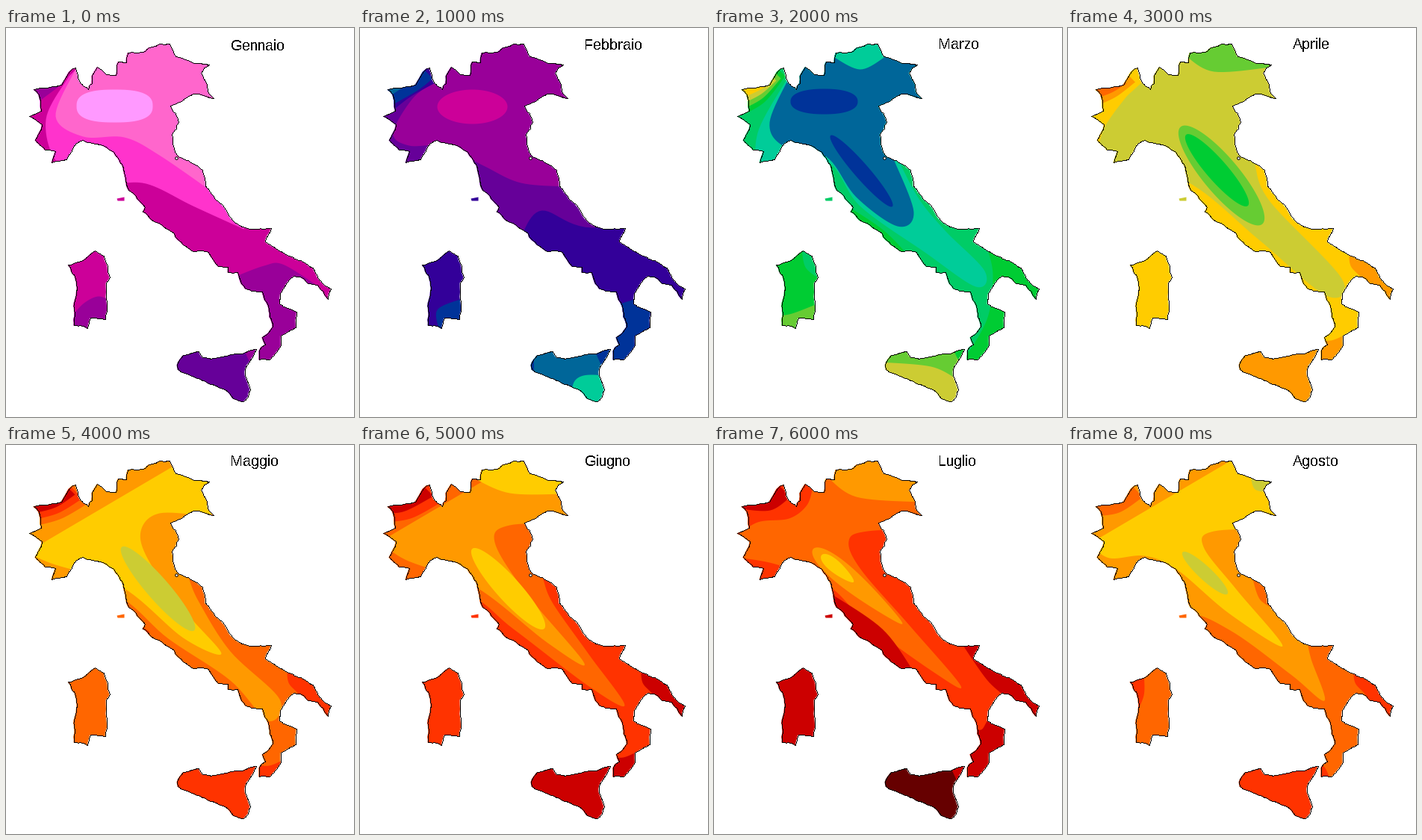
Write a matplotlib script that moves like this. It is 466x521 px and loops after 8 s.

```python
import matplotlib.pyplot as plt
import numpy as np
from matplotlib.animation import FuncAnimation
from matplotlib.patches import Circle, Polygon

W, H = 466, 521
plt.rcParams["text.antialiased"] = False
plt.rcParams["text.hinting"] = "native"
plt.rcParams["text.hinting_factor"] = 1
rng = np.random.default_rng(4)

# Colour scale, cold to hot
ROSE, PINK, FUCHSIA, MAGENTA = "#ff99ff", "#ff66cc", "#ff33cc", "#cc0099"
PURPLE, VIOLET, INDIGO, BLUE = "#990099", "#660099", "#330099", "#003399"
STEEL, TEAL, MINT, GREEN = "#006699", "#00cc99", "#00cc66", "#00cc33"
LIME, OLIVE, YELLOW, ORANGE = "#66cc33", "#cccc33", "#ffcc00", "#ff9900"
AMBER, RED, CRIMSON, MAROON = "#ff6600", "#ff3300", "#cc0000", "#660000"

# Headings, y pointing down
N, S, E, WEST = (0, -1), (0, 1), (1, 0), (-1, 0)
NE, SE, SW, NW, ENE = (1, -1), (1, 1), (-1, 1), (-1, -1), (1.7, -1)


def rough(keys):
    """Coast through the key points, long edges broken up at random."""
    coast = []

    def split(a, b):
        d = b - a
        if np.hypot(*d) < 7:
            coast.append(a)
            return
        mid = (a + b) / 2 + np.array([-d[1], d[0]]) * rng.normal(0, 0.05)
        split(a, mid)
        split(mid, b)

    keys = np.array(keys, float)
    for a, b in zip(keys, np.roll(keys, -1, axis=0)):
        split(a, b)
    return np.array(coast)


ALPS = [
    (36, 82), (58, 79), (73, 76), (88, 54), (92, 53), (98, 73), (109, 82),
    (114, 64), (121, 52), (133, 62), (146, 63), (149, 45), (160, 46),
    (162, 33), (183, 32), (190, 26), (218, 21), (226, 38), (250, 47),
    (271, 49), (260, 60), (268, 75), (269, 85), (277, 94)]
EAST = [
    (266, 91), (250, 88), (234, 98), (219, 104), (230, 126), (221, 142),
    (222, 155), (231, 173), (262, 190), (279, 229), (305, 260), (325, 269),
    (354, 268), (346, 286), (377, 305), (410, 321), (434, 349), (430, 363),
    (416, 344), (393, 333), (384, 332), (366, 356), (365, 369), (388, 380),
    (387, 401), (367, 412), (367, 425), (352, 444), (338, 444), (338, 432)]
SOUTHWEST = [
    (346, 424), (342, 414), (356, 400), (350, 372), (342, 353), (328, 352),
    (314, 342), (309, 327), (296, 327), (296, 320), (283, 319), (270, 300),
    (250, 299), (236, 290), (208, 264), (182, 246), (185, 240), (163, 217),
    (155, 184), (143, 166), (102, 150), (93, 154), (80, 176), (60, 180),
    (65, 165), (51, 163), (38, 150), (47, 129), (30, 118), (46, 111),
    (45, 98)]
MAIN = rough(ALPS + EAST + SOUTHWEST)
SICILY = rough([
    (228, 451), (236, 438), (257, 433), (262, 441), (283, 441), (315, 436),
    (334, 430), (325, 447), (319, 465), (326, 484), (317, 500), (303, 496),
    (292, 484), (266, 473), (248, 466), (229, 457)])
SARDINIA = rough([
    (82, 317), (100, 312), (118, 298), (130, 305), (138, 334), (133, 341),
    (132, 390), (112, 388), (108, 402), (90, 398), (90, 368), (94, 348),
    (91, 332)])
ELBA = [(148, 228), (158, 226), (158, 231), (149, 231)]

fig = plt.figure(figsize=(W / 100, H / 100), dpi=100, facecolor="white")
ax = fig.add_axes([0, 0, 1, 1])
ax.set(xlim=(-0.5, W - 0.5), ylim=(H - 0.5, -0.5))
ax.axis("off")
months = []


def outline(coast):
    """Trace the coast one pixel wide."""
    for a, b in zip(coast, np.roll(coast, -1, axis=0)):
        steps = int(np.ceil(np.abs(b - a).max())) + 1
        x, y = np.round(np.linspace(a, b, steps)).T
        ax.plot(x, y, ",", color="black", zorder=5)


def paint(pts, color, land=None):
    patch = ax.add_patch(Polygon(pts, fc=color, ec="none"))
    if land is not None:
        patch.set_clip_path(Polygon(land).get_path(), ax.transData)
    months[-1].append(patch)


def smooth(pts, n=12):
    """Catmull-Rom curve through the points."""
    p = np.array([pts[0], *pts, pts[-1]], float)[:, None, :]
    a, b, c, d = p[:-3], p[1:-2], p[2:-1], p[3:]
    t = np.linspace(0, 1, n)[None, :, None]
    curve = (2 * b + (c - a) * t + (2 * a - 5 * b + 4 * c - d) * t**2
             + (3 * b - a - 3 * c + d) * t**3) / 2
    return curve.reshape(-1, 2)


def area(land, color, border, heading):
    """Fill everything beyond a smooth border in the given heading."""
    line = smooth(border)
    paint(np.vstack([line, line[::-1] + 500 * np.array(heading)]), color, land)


def blob(color, x, y, rx, ry, tilt=0, power=2, taper=0, land=MAIN):
    """Tilted superellipse, thinner towards one end if tapered."""
    t = np.linspace(0, 2 * np.pi, 120)
    c, s = np.cos(t), np.sin(t)
    u = rx * np.sign(c) * np.abs(c) ** (2 / power)
    v = ry * np.sign(s) * np.abs(s) ** (2 / power) * (1 - taper * c)
    ct, st = np.cos(np.radians(tilt)), np.sin(np.radians(tilt))
    paint(np.column_stack([x + u * ct - v * st, y + u * st + v * ct]),
          color, land)


def alps(outer, inner, *colors):
    """Nested bands in the north-west corner."""
    for f, color in zip(np.linspace(0, 1, len(colors)), colors):
        border = (1 - f) * np.array(outer) + f * np.array(inner)
        area(MAIN, color, border, NW)


def heel(color, dx=0):
    border = [(376, 295), (378, 318), (395, 340), (398, 380)]
    area(MAIN, color, np.array(border) + (dx, 0), E)


def toe(color, y):
    area(MAIN, color, [(330, y), (352, y + 2), (375, y - 8)], S)


def tip(color, x):
    area(SICILY, color, [(x, 428), (x + 10, 450)], E)


def month(name, main, sicily, sardinia, elba, baseline=28):
    months.append([ax.text(300, baseline - 0.5, name, fontsize=14.4,
                           family="Liberation Sans", va="baseline")])
    for land, color in ((MAIN, main), (SICILY, sicily),
                        (SARDINIA, sardinia), (ELBA, elba)):
        paint(land, color)


def gennaio():
    month("Gennaio", MAGENTA, VIOLET, MAGENTA, MAGENTA, 30)
    area(MAIN, FUCHSIA, [(84, 64), (53, 122), (70, 182), (130, 207),
                         (187, 208), (250, 238), (318, 269)], NE)
    area(MAIN, PINK, [(92, 56), (66, 118), (103, 145), (158, 146),
                      (205, 170), (280, 222)], NE)
    blob(ROSE, 145, 104, 51, 22, power=2.6)
    area(MAIN, PURPLE, [(42, 99), (77, 73)], NW)
    area(MAIN, PURPLE, [(305, 333), (345, 318), (370, 316), (414, 343)], S)
    tip(PURPLE, 317)
    area(SARDINIA, PURPLE, [(88, 385), (104, 368), (123, 359), (140, 365)], S)


def febbraio():
    month("Febbraio", VIOLET, STEEL, INDIGO, INDIGO, 29)
    area(MAIN, PURPLE, [(101, 71), (70, 94), (44, 140), (65, 157), (112, 158),
                        (165, 184), (215, 207), (280, 212)], NE)
    blob(MAGENTA, 150, 105, 47, 23)
    area(MAIN, INDIGO, [(40, 113), (68, 91), (106, 70)], NW)
    area(MAIN, BLUE, [(40, 104), (77, 83), (97, 67)], NW)
    area(MAIN, STEEL, [(36, 93), (60, 77)], NW)
    area(MAIN, INDIGO, [(216, 276), (243, 244), (310, 267), (450, 250)], SE)
    area(MAIN, BLUE, [(335, 374), (354, 367), (395, 355)], S)
    blob(TEAL, 310, 484, 26, 20, power=2.5, land=SICILY)
    tip(BLUE, 312)
    area(SICILY, BLUE, [(232, 435), (232, 462)], WEST)
    area(SARDINIA, BLUE, [(107, 408), (103, 377), (140, 361)], SE)


def marzo():
    month("Marzo", MINT, OLIVE, GREEN, MINT)
    area(MAIN, TEAL, [(97, 68), (58, 140), (68, 182), (150, 178), (195, 238),
                      (282, 300), (350, 346), (362, 325), (310, 272),
                      (275, 230), (250, 184)], NE)
    area(MAIN, STEEL, [(101, 64), (74, 126), (93, 158), (150, 172),
                       (190, 226), (245, 265), (267, 246), (240, 175)], NE)
    area(MAIN, TEAL, [(156, 36), (195, 55), (229, 38)], N)
    blob(BLUE, 147, 98, 45, 17, power=2.3)
    blob(BLUE, 197, 191, 63, 10, 49)
    area(MAIN, GREEN, [(180, 239), (226, 270), (258, 302)], SW)
    area(MAIN, GREEN, [(366, 296), (373, 332), (365, 390), (330, 450)], E)
    alps([(40, 115), (68, 98), (95, 64)], [(36, 94), (60, 83), (77, 73)],
         GREEN, LIME, OLIVE, YELLOW)
    area(SICILY, LIME, [(222, 447), (290, 453), (325, 470)], N)
    tip(GREEN, 319)
    area(SARDINIA, MINT, [(117, 295), (122, 320), (140, 335)], NE)
    area(SARDINIA, LIME, [(84, 385), (104, 382), (138, 369)], S)


def aprile():
    month("Aprile", YELLOW, ORANGE, YELLOW, OLIVE)
    area(MAIN, OLIVE, [(100, 64), (45, 140), (60, 185), (158, 205),
                       (255, 283), (345, 358), (366, 335), (270, 232),
                       (250, 184)], NE)
    area(MAIN, LIME, [(156, 36), (195, 58), (272, 52)], N)
    blob(LIME, 205, 197, 85, 24, 50)
    blob(GREEN, 199, 190, 63, 14, 49)
    alps([(40, 113), (70, 97), (101, 70)], [(36, 94), (58, 86), (78, 74)],
         YELLOW, ORANGE, AMBER)
    heel(ORANGE)
    toe(ORANGE, 416)


def maggio():
    month("Maggio", AMBER, RED, AMBER, AMBER)
    area(MAIN, ORANGE, [(30, 200), (140, 198), (217, 259), (300, 315),
                        (350, 369), (366, 340), (300, 276), (258, 210),
                        (245, 180)], N)
    area(MAIN, YELLOW, [(28, 143), (60, 158), (155, 190), (237, 258),
                        (288, 279), (240, 223), (191, 155), (180, 115),
                        (205, 91), (270, 95)], ENE)
    blob(OLIVE, 203, 192, 74, 15, 49)
    alps([(38, 108), (74, 98), (112, 76)], [(36, 91), (66, 83), (92, 66)],
         AMBER, RED, CRIMSON)
    area(MAIN, RED, [(178, 240), (192, 250)], SW)
    heel(RED)
    toe(RED, 427)


def giugno():
    month("Giugno", RED, CRIMSON, RED, RED)
    area(MAIN, AMBER, [(30, 200), (140, 200), (205, 246), (305, 322),
                       (354, 348), (306, 280), (258, 212), (245, 180)], N)
    area(MAIN, ORANGE, [(28, 128), (60, 153), (155, 190), (250, 264),
                        (300, 292), (222, 198), (180, 130), (200, 107),
                        (285, 105)], ENE)
    blob(YELLOW, 198, 192, 72, 16, 48)
    area(MAIN, YELLOW, [(150, 43), (200, 64), (275, 65)], N)
    alps([(36, 103), (70, 97), (112, 74)], [(34, 91), (60, 88), (98, 68)],
         RED, CRIMSON)
    heel(CRIMSON)
    toe(CRIMSON, 416)


def luglio():
    month("Luglio", RED, MAROON, CRIMSON, CRIMSON)
    area(MAIN, AMBER, [(30, 150), (85, 160), (154, 189), (206, 240),
                       (294, 304), (330, 322), (262, 242), (196, 166),
                       (180, 128), (205, 115), (290, 112)], N)
    area(MAIN, RED, [(26, 124), (58, 103), (100, 98), (124, 80), (132, 55)],
         NW)
    area(MAIN, ORANGE, [(149, 40), (190, 69), (275, 76)], N)
    area(MAIN, YELLOW, [(147, 50), (154, 41)], NW)
    blob(ORANGE, 192, 189, 78, 13, 40, taper=0.5)
    blob(YELLOW, 165, 165, 28, 8, 40, taper=0.3)
    area(MAIN, CRIMSON, [(34, 85), (75, 87), (102, 69)], NW)
    area(MAIN, CRIMSON, [(155, 198), (225, 246), (267, 303)], SW)
    area(MAIN, CRIMSON, [(329, 262), (365, 314), (398, 347), (398, 380)], E)
    area(MAIN, CRIMSON, [(340, 374), (357, 381), (370, 364), (400, 350)], S)
    tip(CRIMSON, 315)


def agosto():
    month("Agosto", AMBER, RED, AMBER, AMBER)
    area(MAIN, ORANGE, [(30, 220), (150, 222), (217, 248), (298, 307),
                        (343, 342), (325, 286), (319, 258)], N)
    area(MAIN, YELLOW, [(28, 132), (55, 151), (102, 148), (145, 166),
                        (215, 225), (287, 269), (225, 193), (181, 136),
                        (195, 115), (285, 112)], ENE)
    blob(OLIVE, 183, 171, 41, 9, 43)
    area(MAIN, OLIVE, [(244, 42), (250, 59), (270, 63)], NE)
    area(MAIN, AMBER, [(34, 95), (68, 90), (100, 69)], NW)
    area(MAIN, AMBER, [(247, 180), (257, 207), (280, 221)], NE)
    heel(RED, 6)
    area(MAIN, RED, [(334, 429), (343, 431), (351, 448)], WEST)
    area(SARDINIA, RED, [(101, 305), (101, 335), (88, 364)], WEST)


for draw in (gennaio, febbraio, marzo, aprile, maggio, giugno, luglio, agosto):
    draw()
for coast in (MAIN, SICILY, SARDINIA):
    outline(coast)
ax.add_patch(Circle((228, 174), 1.8, fc="white", ec="black", lw=0.72,
                    zorder=6))


def update(i):
    for k, artists in enumerate(months):
        for artist in artists:
            artist.set_visible(k == i)


anim = FuncAnimation(fig, update, frames=len(months), interval=1000,
                     repeat=True, repeat_delay=0, blit=False)
plt.show()
```
